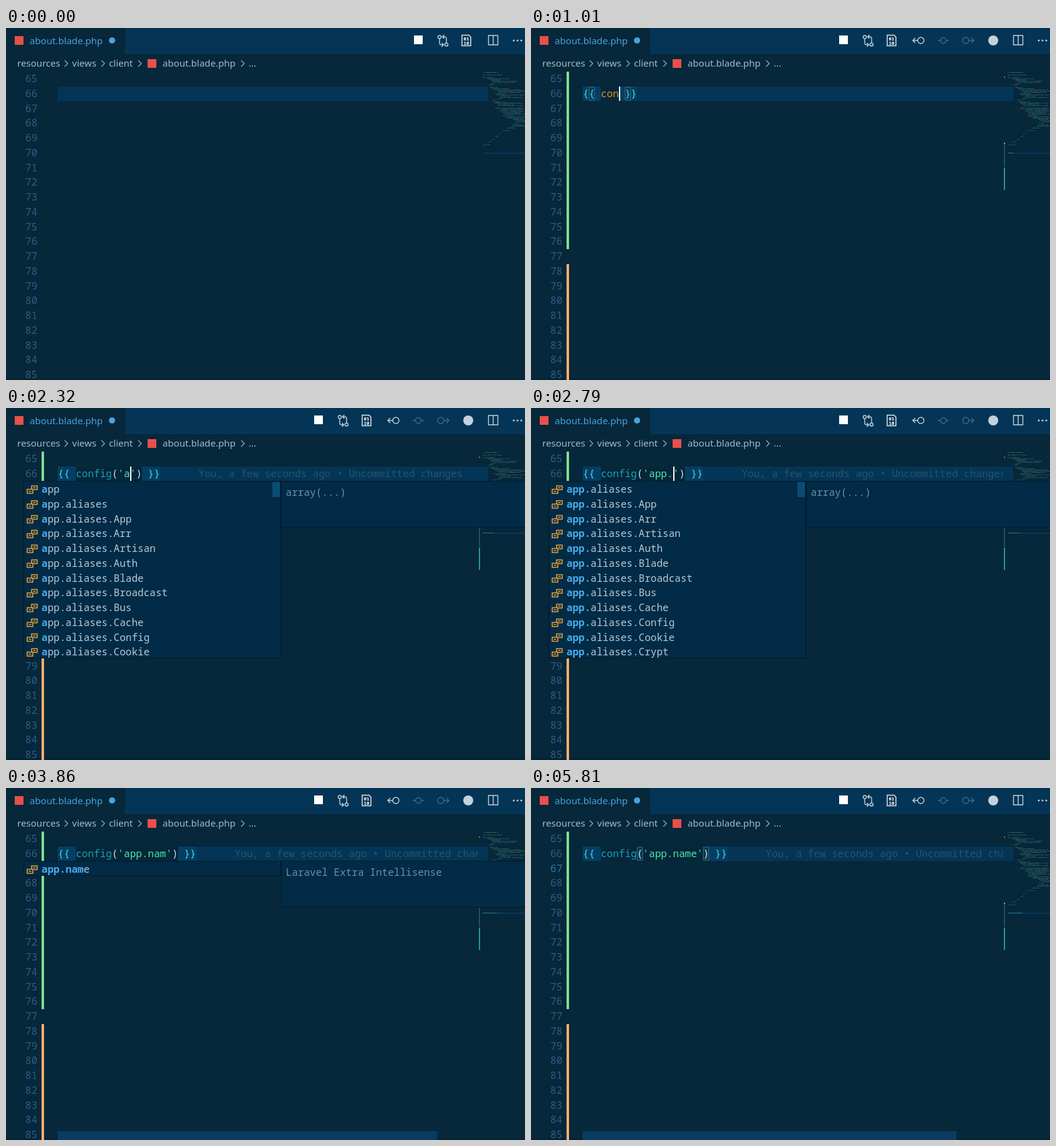
Recreate the animation shown at these times as an HTML page with a canvas. Size 832 by 565 pixels, loop 6.04 s.

```html
<!DOCTYPE html>
<html lang="en">
<head>
<meta charset="utf-8">
<title>Editor autocomplete</title>
<style>
html, body { margin: 0; width: 832px; height: 565px; overflow: hidden; background: #07273b; }
canvas { display: block; }
</style>
</head>
<body>
<canvas id="stage" width="832" height="565"></canvas>
<script>
const ctx = document.getElementById('stage').getContext('2d');
const LOOP = 6040, CHAR = 9.637, LEFT = 83, ROW = 23.75;
const MONO = '16.06px "Noto Sans Mono", monospace';
const SANS = '15.1px "Noto Sans", sans-serif';
const BG = '#07273b', BAR = '#043556', POPUP = '#012b46', FG = '#b4cbd8', RED = '#e8504a';

// The bar marks the caret.
const typing = [
  [0, ''], [80, '{|}'], [230, '{{|}}'], [300, '{{ | }}'], [550, '{{ c| }}'], [700, '{{ co| }}'],
  [1010, '{{ con| }}'], [1090, '{{ conf| }}'], [1240, '{{ confi| }}'], [1320, '{{ config| }}'],
  [1550, '{{ config(|) }}'], [1930, "{{ config('|') }}"], [2240, "{{ config('a|') }}"],
  [2390, "{{ config('ap|') }}"], [2470, "{{ config('app|') }}"], [2790, "{{ config('app.|') }}"],
  [3100, "{{ config('app.n|') }}"], [3250, "{{ config('app.na|') }}"],
  [3330, "{{ config('app.nam|') }}"], [4340, "{{ config('app.name|') }}"]
];
const alias = names => names.split(' ').map(n => 'app.aliases.' + n);
const aliases = ['app.aliases', ...alias('App Arr Artisan Auth Blade Broadcast Bus Cache Config Cookie Crypt')];
const lists = [
  [2090, ['app', ...aliases.slice(0, 11)]],
  [2790, aliases],
  [3100, ['app.name', 'app.env', 'app.timezone', ...alias('Notification Config Artisan Lang Session Eloquent Validation Json Queue')]],
  [3250, ['app.name', 'app.aliases.Notification']],
  [3330, ['app.name']],
  [4340, []]
];
const at = (steps, t) => steps.reduce((now, [start, value]) => t >= start ? value : now, null);

function rect(x, y, w, h, color) {
  ctx.fillStyle = color;
  ctx.fillRect(x, y, w, h);
}
function text(str, x, y, color, font = MONO) {
  ctx.font = font;
  ctx.fillStyle = color;
  ctx.fillText(str, x, y);
}
function disc(x, y, r, color) {
  ctx.fillStyle = color;
  ctx.fill(new Path2D(`M${x - r} ${y}a${r} ${r} 0 1 0 ${2 * r} 0a${r} ${r} 0 1 0 ${-2 * r} 0`));
}
function line(d, x, y, color = '#c3d2dc', width = 1.4) {
  ctx.save();
  ctx.translate(x, y);
  ctx.strokeStyle = color;
  ctx.lineWidth = width;
  ctx.stroke(new Path2D(d));
  ctx.restore();
}
const ring = (x, y, r) => `M${x - r} ${y}a${r} ${r} 0 1 0 ${2 * r} 0a${r} ${r} 0 1 0 ${-2 * r} 0`;

function header(git) {
  rect(191, 0, 641, 42, BAR);
  rect(14, 13, 14, 14, RED);
  text('about.blade.php', 38, 26, '#49a3dc', SANS);
  disc(170, 20, 5, '#49a3dc');

  const shift = git ? 0 : 160;
  rect(494 + shift, 12, 14, 14, '#fff');
  line(ring(-5.5, -5.5, 2.5) + ring(5.5, 6.5, 2.5) +
    'M-5.5 -3V4Q-5.5 7 -2 7H1M-2 4L1 7L-2 10M5.5 4V-3Q5.5 -6 2 -6H-1M2 -9L-1 -6L2 -3', 540.5 + shift, 20);
  line('M-7 -8.5H4L7 -5.5V8.5H-7Z', 578 + shift, 20, '#dce6ec', 1.5);
  const tiny = 'bold 7.5px "Noto Sans Mono", monospace';
  text('01', 573.5 + shift, 19.5, '#fff', tiny);
  text('10', 573.5 + shift, 26.5, '#fff', tiny);
  if (git) {
    line(ring(4, 0, 5) + 'M-1 0H-9M-5 -4L-9 0L-5 4', 621, 20);
    line(ring(0, 0, 4.5) + 'M-9 0H-4.5M4.5 0H9', 661, 20, '#3f6b86');
    line(ring(-4, 0, 5) + 'M1 0H9M5 -4L9 0L5 4', 701, 20, '#3f6b86');
    disc(741, 20, 8, '#c3d2dc');
  }
  line('M-7.5 -7.5H7.5V7.5H-7.5ZM0 -7.5V7.5', 781, 19.5);
  for (let i = 0; i < 3; i++) disc(814 + i * 6, 20, 1.5, '#c3d2dc');

  [['resources', 18], ['views', 106], ['client', 165], ['about.blade.php', 251], ['...', 389]]
    .forEach(([name, x]) => text(name, x, 62, '#9fbccc', SANS));
  for (const x of [94, 153, 212, 377]) line('M0 -5L5 0L0 5', x, 57, '#8fb0c2', 1.3);
  rect(227, 50, 14, 14, RED);
}

// Rows of y, indent, length.
const mapRows = [
  [71, 0, 25], [75, 0, 31], [79, 0, 19], [81, 8, 36], [83, 13, 16], [85, 15, 40], [87, 18, 33], [89, 12, 8],
  [91, 9, 8], [95, 12, 12], [97, 16, 27], [99, 20, 45], [101, 24, 44], [103, 26, 35], [105, 20, 18], [107, 22, 45],
  [109, 26, 18], [111, 28, 36], [113, 24, 7], [115, 16, 8], [118, 16, 21], [120, 20, 45], [122, 24, 26],
  [124, 25, 40], [128, 20, 44], [130, 24, 44], [132, 28, 36], [134, 28, 40], [136, 33, 29], [138, 36, 32],
  [140, 32, 17], [142, 36, 32], [144, 40, 28], [146, 49, 16], [148, 52, 16], [150, 55, 13], [152, 50, 9],
  [155, 48, 18], [157, 48, 20], [160, 40, 11], [164, 32, 12], [168, 28, 2], [171, 24, 2], [174, 20, 6],
  [178, 16, 2], [181, 12, 2], [183, 8, 4], [187, 0, 12]
];
function minimap(git, length) {
  let seed = 7;
  const random = () => (seed = seed * 16807 % 2147483647) / 2147483647;
  for (const [y, indent, size] of mapRows) {
    for (let x = 0; x < size;) {
      const w = 1 + Math.floor(random() * 5);
      const color = random() < .12 ? '#65494a' : random() < .6 ? '#20585d' : '#28665d';
      rect(764 + indent + x, y, Math.min(w, size - x), 1, color);
      x += w + (random() < .6 ? 1 : 0);
    }
  }
  rect(764, 200, 68, 2, '#073a5c');
  rect(764, 200, length, 1, '#2b6a7c');
  if (git) {
    rect(758, 78, 2, 2, '#b06350');
    rect(758, 184, 2, 38, '#1f5460');
    rect(758, 184, 2, 2, '#5cb98c');
    rect(758, 224, 2, 36, '#2a9985');
  }
}

function gutter(t, git) {
  for (let n = 65; n <= 85; n++)
    text(n, 31, 87 + (n - 65) * ROW, n === 67 && t >= 4340 ? '#2f78a8' : '#2c5f85');
  if (git) {
    rect(57, 70, 4, 285, '#7fe08f');
    rect(57, 379, 4, 186, '#fcb16f');
  }
}

function codeLine(t) {
  const marked = at(typing, t), caret = marked.indexOf('|'), code = marked.replace('|', '');
  const column = i => LEFT + i * CHAR;
  rect(LEFT, 94, 690, 23, BAR);
  if (code) {
    const close = code.indexOf('}'), open = code.indexOf('('), end = code.length;
    rect(LEFT, 94, end * CHAR, 23, '#043f63');
    if (close > 4) rect(column(3), 94, (close - 4) * CHAR, 23, '#06263a');

    const pair = t < 1550 ? [code.lastIndexOf('{'), close] : t >= 4340 ? [open, code.indexOf(')')] : [];
    for (const i of pair) {
      rect(column(i), 95, CHAR, 21, '#0b3850');
      line(`M.5 .5H${CHAR - .5}V21.5H.5Z`, column(i), 94.5, '#2b7591', 1);
    }
    [...code].forEach((c, i) => {
      const color = '{}'.includes(c) ? '#49d6e9' : '()'.includes(c) ? '#c5dfe8'
        : open < 0 ? '#d5971a' : i < open ? '#16a3b6' : '#49e9a6';
      text(c, column(i), 111, color);
    });
    if (t >= 1320) {
      ctx.save();
      ctx.beginPath();
      ctx.rect(LEFT, 94, 674, 23);
      ctx.clip();
      text('You, a few seconds ago • Uncommitted changes', column(end) + 62, 111, '#28536f');
      ctx.restore();
    }
    const blinkOff = t >= 3860 && t < 4340 || t >= 4870 && t < 5330 || t >= 5810;
    if (!blinkOff) rect(Math.round(column(caret)), 94, 2, 23, '#fff');
  }
  return code;
}

function box(x, y, w, h) {
  rect(x, y, w, h, '#03192a');
  rect(x + 1, y + 1, w - 2, h - 2, POPUP);
}
function popup(t, code) {
  const items = at(lists, t) || [];
  if (!items.length) return;
  const typed = code.split("'")[1];
  box(28, 117, 413, Math.round(items.length * ROW));
  items.forEach((item, i) => {
    const y = 136 + i * ROW;
    line('M8 -6V-11H17V-5H11M1 -5.5H10V1H1ZM3.5 -2.2H7.5M10.5 -8H14.5', 33, y, '#e3a038', 1.6);
    text(typed, 57, y, '#49ace9', 'bold ' + MONO);
    text(item.slice(typed.length), 57 + typed.length * CHAR, y, FG);
  });
  if (items.length > 9) rect(427, 119, 12, 24, '#0a4c78');
  box(441, 117, 392, 75);
  text(t < 3710 ? 'array(...)' : 'Laravel Extra Intellisense', 448.5, 141, '#6791a9');
}

function draw(t) {
  const git = t >= 780;
  rect(0, 0, 832, 565, BG);
  header(git);
  gutter(t, git);
  rect(0, 562, 832, 3, '#062235');
  if (git) rect(57, 560, 4, 5, '#fcb16f');
  if (t >= 3710) rect(LEFT, 551, t < 4720 ? 608 : 599, 14, '#093c60');
  const code = codeLine(t);
  minimap(git, code.length);
  popup(t, code);
}

const start = performance.now();
function tick() {
  draw((performance.now() - start) % LOOP);
  requestAnimationFrame(tick);
}
tick();
</script>
</body>
</html>
```
